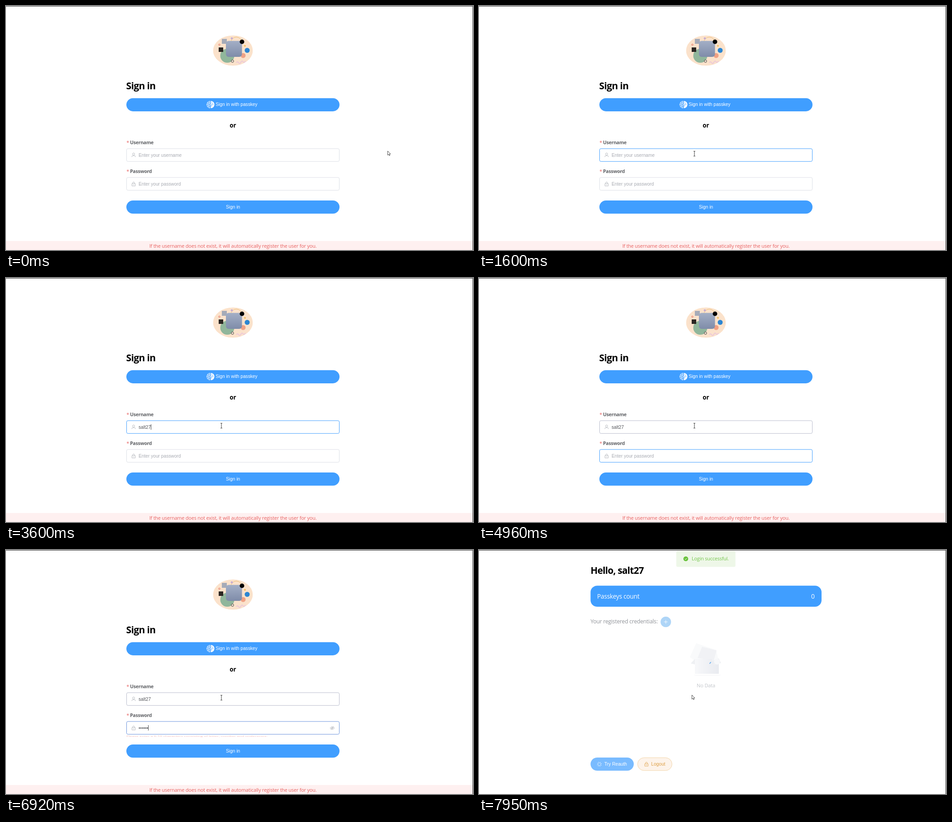
These frames come from a looping animation (1032 px wide and 542 px high, 7990 ms). An HTML page:

```html
<!DOCTYPE html>
<html lang="en">
<head>
<meta charset="utf-8">
<title>Sign in</title>
<style>
html, body { margin: 0; width: 100%; height: 100%; overflow: hidden; background: #fff; }
svg { display: block; }
text { font: 10.2px "Liberation Sans", Arial, sans-serif; white-space: pre; }
.ui { font-family: "Open Sans", "Noto Sans", sans-serif; }
.bold { font-weight: 700; }
.label { font-size: 10.6px; letter-spacing: -.3px; font-weight: 700; fill: #606266; }
.err { font-size: 8.93px; fill: #e8605f; }
.mid { text-anchor: middle; }
.hint { fill: #a8abb2; }
.value { fill: #55575c; }
.white { fill: #fff; }
.line { fill: none; stroke: #a8abb2; stroke-width: .8; }
.box { fill: #fff; stroke-width: 1; }
</style>
</head>
<body>
<svg width="1032" height="542" viewBox="0 0 1032 542">
  <defs>
    <linearGradient id="tile" x2="0" y2="1"><stop stop-color="#a3afc6"/><stop offset="1" stop-color="#7f8ca9"/></linearGradient>
    <linearGradient id="carton" x2="1"><stop stop-color="#f7f8fa"/><stop offset="1" stop-color="#e9ebf0"/></linearGradient>
    <clipPath id="oval"><ellipse cx="501.5" cy="99" rx="44" ry="33.7"/></clipPath>
    <path id="spokes" d="M0-5V-2.6M0 5V2.6M-5 0H-2.6M5 0H2.6M-3.5-3.5-1.9-1.9M3.5 3.5 1.9 1.9M-3.5 3.5-1.9 1.9M3.5-3.5 1.9-1.9" stroke="#fff" stroke-width=".8" stroke-linecap="round"/>
    <path id="lock" d="M-3.7-.8H3.7V4.3H-3.7ZM-2.1-.8V-2.4A2.1 2.1 0 0 1 2.1-2.4V-.8M0 1V2.6"/>
  </defs>

  <g id="login">
    <g clip-path="url(#oval)">
      <ellipse cx="501.5" cy="99" rx="44" ry="33.7" fill="#fbe2cb"/>
      <circle cx="489" cy="110.5" r="15.5" fill="#90b69b"/>
      <circle cx="509" cy="81" r="12" fill="none" stroke="#e9b45c" stroke-width=".8"/>
      <circle cx="499" cy="72" r="2.4" fill="#c9aed0"/>
      <circle cx="471.5" cy="86" r="1.7" fill="none" stroke="#e5705c"/>
      <path d="M509 126q2.500-4 5 0t5-1 5-1 5-2" fill="none" stroke="#ecc9d8" stroke-width="2"/>
      <path d="M528 85.500l.8 2.300 2.200.7-2.200.8-.8 2.200-.8-2.200-2.200-.8 2.200-.7z" fill="#f2b63c"/>
    </g>
    <rect x="477" y="73" width="11" height="11" fill="#a6abb8"/>
    <rect x="470" y="92" width="10" height="10" fill="#2b2622"/>
    <circle cx="524" cy="110" r="5.500" fill="#f0a184"/>
    <circle cx="533" cy="98.500" r="5.500" fill="#2c86d2"/>
    <rect x="486" y="77.500" width="35.500" height="35.500" rx="6" fill="url(#tile)"/>
    <circle cx="521.500" cy="79.500" r="5" fill="#000"/>
    <circle cx="500.500" cy="122.500" r="2.700" fill="#f8e6d6" stroke="#333" stroke-width="1"/>

    <text class="ui bold" x="265.500" y="185" style="font-size:21px;letter-spacing:-.62px">Sign in</text>

    <rect x="266" y="204.700" width="471" height="29.200" rx="14.600" fill="#409eff"/>
    <g transform="translate(452 219)" fill="none">
      <path d="M.6-8A8 8 0 0 1 .6 8Z" fill="#fff"/>
      <path d="M2-5.500Q6-3 5.500 1M2-2Q4 0 2 4" stroke="#409eff" stroke-width=".9"/>
      <path d="M-.6-7.500A7.500 7.500 0 0 0-.6 7.500M-.6-5.300A5.300 5.300 0 0 0-.6 5.300M-.6-3.100A3.100 3.100 0 0 0-.6 3.100M-.6-1V1.200" stroke="#fff" stroke-width="1.200" stroke-dasharray="4 .8"/>
    </g>
    <text class="white" x="463.300" y="222.400">Sign in with passkey</text>
    <text class="ui bold mid" x="501.500" y="269.500" style="font-size:13.300px">or</text>

    <text class="ui label" x="266.300" y="307" style="fill:#e8605f;font-weight:400">*</text>
    <text class="ui label" x="274" y="306.700">Username</text>
    <rect id="userBox" class="box" x="266.500" y="316.900" width="470" height="28.400" rx="2.900"/>
    <g class="line"><circle cx="282" cy="328.900" r="2.400"/><path d="M278 335.300Q278 332.300 280.600 332.300H283.400Q286 332.300 286 335.300"/></g>
    <text id="userText" x="293" y="334.600"></text>
    <text id="userErr" class="ui err" x="266" y="355">Please enter a 4-8 characters consisting of letter, number and underscore.</text>

    <text class="ui label" x="266.300" y="371" style="fill:#e8605f;font-weight:400">*</text>
    <text class="ui label" x="274" y="370.700">Password</text>
    <rect id="passBox" class="box" x="266.500" y="380.900" width="470" height="28.400" rx="2.900"/>
    <use href="#lock" class="line" x="282" y="395.500"/>
    <text id="passText" x="293" y="398.600"></text>
    <g id="eye" class="line"><path d="M716 395.500Q721 389.800 726 395.500Q721 401.200 716 395.500Z"/><circle cx="721" cy="395.500" r="1.700"/><path d="M717.500 399 724.500 392"/></g>
    <text id="passErr" class="ui err" x="266" y="419">Please enter a 6-10 characters consisting of letter, number and underscore.</text>

    <rect id="caret" width="1" height="12" fill="#44464a"/>

    <rect id="submit" x="266" y="432" width="471" height="29.200" rx="14.600"/>
    <use id="spinA" href="#spokes"/>
    <text id="submitText" class="white" y="449.500">Sign in</text>

    <rect y="522" width="1031" height="20" fill="#fef0f0"/>
    <text class="ui mid" x="501.500" y="537" style="font-size:10.900px;letter-spacing:-.19px;fill:#e8605f">If the username does not exist, it will automatically register the user for you.</text>
  </g>

  <g id="home">
    <text class="ui bold" x="246.500" y="52.500" style="font-size:20.700px;letter-spacing:-.7px">Hello, salt27</text>
    <rect x="246.500" y="79.300" width="510.500" height="46.700" rx="14.500" fill="#409eff"/>
    <g class="white">
      <text class="ui" x="261" y="108" style="font-size:13.800px;letter-spacing:-.27px">Passkeys count</text>
      <text class="ui" x="734" y="108" style="font-size:13.800px">0</text>
    </g>
    <text class="ui" x="246.500" y="163" style="font-size:12.200px;letter-spacing:-.24px;fill:#909399">Your registered credentials:</text>
    <circle cx="412.800" cy="159.700" r="11.600" fill="#aed5f7"/>
    <path d="M408.800 159.700H416.800M412.800 155.700V163.700" stroke="#fff" stroke-width=".9"/>
    <path d="M474 277H536L530 280H479Z" fill="#fafafb"/>
    <path d="M466 238 480 207 524 222 529 243 477 246Z" fill="#f9fafb"/>
    <path d="M483 240 493 215 525 223 519 245Z" fill="#f1f2f5"/>
    <path d="M477 242 468 252 477 254ZM530 241 535 251 519 255 515 246Z" fill="#eef0f3"/>
    <path d="M477 242H515L519 255 530 252V275H477Z" fill="url(#carton)"/>
    <circle cx="526" cy="248" r="6.500" fill="#f7f8fa"/>
    <path d="M509.500 252.500 512.500 249" stroke="#5aa8ee" stroke-width="1.500"/>
    <text class="ui mid" x="501.500" y="305.300" style="font-size:11.100px;letter-spacing:-.18px;fill:#c3c6cb">No Data</text>
    <rect x="246.500" y="461" width="95.500" height="29.200" rx="14.600" fill="#79bbff"/>
    <use id="spinB" href="#spokes"/>
    <text class="white" x="277" y="479">Try Reauth</text>
    <rect x="350.500" y="461.400" width="76" height="28.400" rx="14.200" fill="#fdf3ea" stroke="#f3d5a8"/>
    <use href="#lock" class="line" x="370" y="475.800" style="stroke:#dda047"/>
    <text x="380.500" y="479" fill="#dda047">Logout</text>
    <g id="toast">
      <rect x="436" y="2" width="130.700" height="35.500" rx="2.900" fill="#eef7e8"/>
      <circle cx="457" cy="19.500" r="5.300" fill="#67c23a"/>
      <path d="M454.600 19.600 456.400 21.400 459.500 18" fill="none" stroke="#fff"/>
      <text class="ui" x="470" y="23.300" style="font-size:10.900px;letter-spacing:-.19px;fill:#74c64b">Login successful.</text>
    </g>
  </g>

  <path d="M0 .5H1031.500V542" fill="none" stroke="#3a3a3a"/>
  <path id="arrow" d="M0 0V9.300L2.100 7.300 3.500 10.500 5 9.900 3.600 6.800H6.400Z" fill="#fff" stroke="#222" stroke-width=".8"/>
  <path id="beam" d="M3.500.5H5Q5.500.5 5.500 1.200Q5.500.5 6 .5H7.500M5.500 1V11M3.500 11.500H5Q5.500 11.500 5.500 10.800Q5.500 11.500 6 11.500H7.500" fill="none" stroke="#222" stroke-width=".9"/>
</svg>
<script>
const LOOP = 7990, FOCUS_USER = 1090, FOCUS_PASS = 4460, SUBMIT = 7290, HOME = 7870;
const USER = 'salt27';
const userKeys = [2170, 2370, 2580, 2780, 3320, 3470];
const passKeys = [5490, 5700, 5900, 6390, 6590, 6770];
const IDLE = [220, 223, 230], HOVER = [184, 188, 204], BLUE = [64, 158, 255], RED = [240, 106, 106];
const userBorder = [[0, IDLE], [1040, HOVER], [FOCUS_USER, BLUE], [2170, RED], [2780, BLUE], [FOCUS_PASS - 40, HOVER]];
const passBorder = [[0, IDLE], [FOCUS_PASS - 40, BLUE], [5490, RED], [6770, BLUE]];
// time, x and y of the arrow tip
const path = [[250, 843.5, 322], [330, 815, 328.5], [450, 720, 306], [560, 600, 293], [680, 490, 292.500],
  [770, 437, 299], [860, 448, 312], [980, 470.5, 322]];

const el = {};
document.querySelectorAll('[id]').forEach(e => el[e.id] = e);
const set = (e, name, value) => e.setAttribute(name, value);
const show = (e, on) => set(e, 'visibility', on ? 'visible' : 'hidden');
const ramp = (t, start, length) => Math.min(1, Math.max(0, (t - start) / length));
const ease = k => k * k * (3 - 2 * k);
const count = (keys, t) => keys.filter(k => k <= t).length;

function border(steps, t) {
  let color = steps[0][1];
  for (const [at, next] of steps) {
    const k = ease(ramp(t, at, 220));
    color = color.map((c, i) => c + (next[i] - c) * k);
  }
  return `rgb(${color.map(Math.round)})`;
}

function pointer(t) {
  if (t <= path[0][0]) return path[0].slice(1);
  for (let i = 1; i < path.length; i++) {
    const [a, ax, ay] = path[i - 1], [b, bx, by] = path[i];
    if (t < b) {
      const k = (t - a) / (b - a);
      return [ax + (bx - ax) * k, ay + (by - ay) * k];
    }
  }
  return path[path.length - 1].slice(1);
}

function field(text, value, hint) {
  text.textContent = value || hint;
  set(text, 'class', value ? 'value' : 'hint');
  return value ? text.getComputedTextLength() : 0;
}

// The message unfolds downwards from its top edge.
function message(e, t, top, start, end) {
  const k = ease(ramp(t, start, 290)) * (1 - ease(ramp(t, end, 290)));
  show(e, k > 0);
  set(e, 'opacity', k);
  set(e, 'transform', `translate(0 ${top}) scale(1 ${Math.max(k, .01)}) translate(0 ${-top})`);
}

function draw(t) {
  const home = t >= HOME, busy = t >= SUBMIT, inPass = t >= FOCUS_PASS;
  set(el.login, 'display', home ? 'none' : 'inline');
  set(el.home, 'display', home ? 'inline' : 'none');

  if (!home) {
    const nUser = count(userKeys, t), nPass = count(passKeys, t);
    const userWidth = field(el.userText, USER.slice(0, nUser), 'Enter your username');
    const passWidth = field(el.passText, '•'.repeat(nPass), 'Enter your password');
    set(el.userBox, 'stroke', border(userBorder, t));
    set(el.passBox, 'stroke', border(passBorder, t));
    message(el.userErr, t, 347, 2170, 2780);
    message(el.passErr, t, 411, 5490, 6770);
    show(el.eye, nPass > 0);

    const last = inPass ? passKeys[nPass - 1] || FOCUS_PASS : userKeys[nUser - 1] || FOCUS_USER;
    show(el.caret, t >= FOCUS_USER && !busy && Math.floor((t - last) / 500) % 2 === 0);
    set(el.caret, 'x', Math.round(293 + (inPass ? passWidth : userWidth) - .2));
    set(el.caret, 'y', inPass ? 389 : 325);

    set(el.submit, 'fill', busy ? '#79bbff' : '#409eff');
    set(el.submitText, 'x', busy ? 494 : 486);
    show(el.spinA, busy);
  }

  const turn = (t - SUBMIT) * .18;
  set(el.spinA, 'transform', `translate(482.6 446.5) rotate(${turn})`);
  set(el.spinB, 'transform', `translate(266 475.8) rotate(${turn})`);

  const k = ease(ramp(t, HOME - 40, 120));
  set(el.toast, 'transform', `translate(0 ${-38 * (1 - k)})`);
  set(el.toast, 'opacity', k);

  const [x, y] = pointer(t), beam = t >= 900 && !busy;
  show(el.beam, beam);
  show(el.arrow, !beam);
  set(beam ? el.beam : el.arrow, 'transform', `translate(${x} ${y})`);
}

const start = performance.now();
function tick() {
  draw((performance.now() - start) % LOOP);
  requestAnimationFrame(tick);
}
tick();
</script>
</body>
</html>
```
